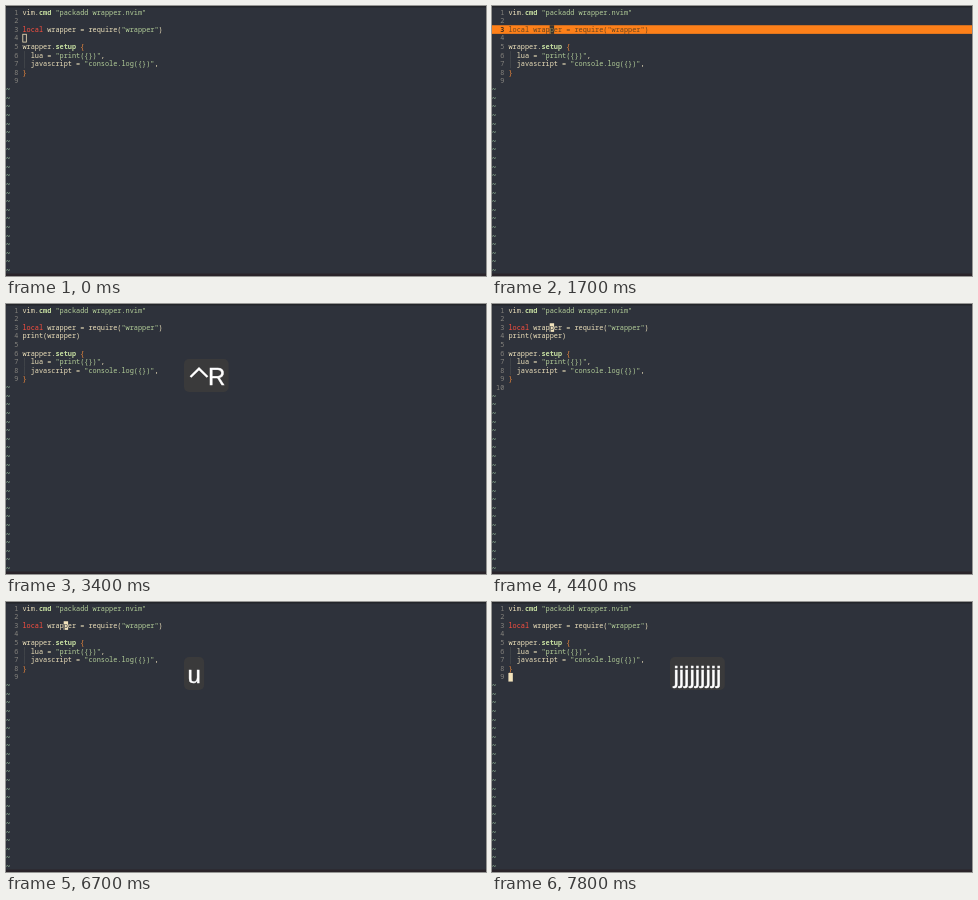
These frames come from a looping animation (480x270 px, 8000 ms). An HTML page with a canvas:

```html
<!DOCTYPE html>
<html lang="en">
<head>
<meta charset="utf-8">
<title>Editor session</title>
<style>
html, body { margin: 0; width: 100%; height: 100%; overflow: hidden; background: #2e323b; }
canvas { display: block; width: 480px; height: 270px; }
</style>
</head>
<body>
<canvas id="stage"></canvas>
<script>
const W = 480, H = 270, LOOP = 8000;
const LINE = 8.62, TOP = 2, LEFT = 16.4, FONT_SIZE = 6.88, COL = FONT_SIZE * 0.6;
const MONO = '"Noto Sans Mono", "DejaVu Sans Mono", monospace';
const KEY_FONT = '24px "Liberation Sans", Arial, sans-serif';
const C = {
  bg: '#2e323b', fg: '#ebdfba', red: '#fb4f40', green: '#b2cd98', func: '#c5dda0',
  orange: '#f38b3c', num: '#85837e', tilde: '#9cc5a0', guide: '#4c4f52',
  flash: '#fe8019', flashText: '#6a4520', cursor: '#f2e3bc', badge: '#3a3a3b'
};

const canvas = document.getElementById('stage');
const ctx = canvas.getContext('2d');
const ratio = window.devicePixelRatio || 1;
canvas.width = W * ratio;
canvas.height = H * ratio;

// Each token: text, colour, bold
const head = [
  [['vim.', C.fg], ['cmd', C.func, true], [' ', C.fg], ['"packadd wrapper.nvim"', C.green]],
  [],
  [['local', C.red], [' wrapper = require', C.fg], ['(', C.fg], ['"wrapper"', C.green], [')', C.fg]]
];
const added = [['print(wrapper)', C.fg]];
const tail = [
  [],
  [['wrapper.', C.fg], ['setup', C.func, true], [' {', C.orange]],
  [['  lua = ', C.fg], ['"print({})"', C.green], [',', C.fg]],
  [['  javascript = ', C.fg], ['"console.log({})"', C.green], [',', C.fg]],
  [['}', C.orange]],
  []
];
const shortDoc = [...head, ...tail];
const longDoc = [...head, added, ...tail];

const rowTop = row => TOP + (row - 1) * LINE;

function put(text, x, row, color, bold) {
  ctx.font = `${bold ? 700 : 500} ${FONT_SIZE}px ${MONO}`;
  ctx.fillStyle = color;
  ctx.fillText(text, x, rowTop(row) + 6.5);
}

function drawRow(tokens, row, flash) {
  let col = 0;
  if (flash) {
    ctx.fillStyle = C.flash;
    ctx.fillRect(0, rowTop(row), W, LINE);
  }
  const label = String(row);
  put(label, LEFT - COL * (label.length + 1), row, flash ? '#3a2c20' : C.num, flash);
  for (const [text, color, bold] of tokens) {
    put(text, LEFT + col * COL, row, flash ? C.flashText : color, bold);
    col += text.length;
  }
  if (tokens.length && tokens[0][0].startsWith('  ')) {
    ctx.fillStyle = C.guide;
    ctx.fillRect(LEFT + COL / 2 - 0.3, rowTop(row), 0.6, LINE);
  }
}

function drawCursor({ row, col, hollow, flash }) {
  const x = LEFT + col * COL, y = rowTop(row);
  if (hollow) {
    ctx.strokeStyle = C.cursor;
    ctx.lineWidth = 0.8;
    ctx.strokeRect(x + 0.4, y + 0.4, COL - 0.6, LINE - 0.8);
    return;
  }
  ctx.fillStyle = flash ? '#39352f' : C.cursor;
  ctx.fillRect(x, y, COL + 0.3, LINE);
  if (row === 3) put('p', x, row, flash ? '#a08a50' : C.bg);
}

function drawKeys({ text, ctrl, alpha = 1 }) {
  const pad = 3.4, x = 178, y = 55, base = y + 26, caret = ctrl ? 20.5 : 0;
  ctx.font = KEY_FONT;
  const width = caret + ctx.measureText(text).width + pad * 2;
  ctx.globalAlpha = alpha;
  ctx.fillStyle = C.badge;
  ctx.beginPath();
  ctx.roundRect(x, y, width, 33, 5);
  ctx.fill();
  ctx.fillStyle = ctx.strokeStyle = '#fff';
  ctx.lineWidth = 0.4;
  ctx.fillText(text, x + pad + caret, base);
  ctx.strokeText(text, x + pad + caret, base);
  if (ctrl) {
    ctx.lineWidth = 2.3;
    ctx.beginPath();
    ctx.moveTo(x + 6.5, y + 18);
    ctx.lineTo(x + 15, y + 9.7);
    ctx.lineTo(x + 23.5, y + 18);
    ctx.stroke();
  }
  ctx.globalAlpha = 1;
}

function cursorAt(t) {
  if (t < 100) return { row: 4, col: 0, hollow: true };
  if (t >= 3400 && t < 3500) return null;
  if (t < 7100) return { row: 3, col: 10, flash: t >= 1700 && t < 1900 };
  if (t < 7600) return { row: 4, col: 0 };
  return { row: Math.min(9, 7 + (t - 7600) / 100), col: 0 };
}

function keysAt(t) {
  if (t >= 3400 && t < 4100) {
    return { text: 'R', ctrl: true, alpha: Math.min(1, (4100 - t) / 400) };
  }
  if (t >= 6600 && t < 7100) return { text: 'u' };
  if (t >= 7600) return { text: 'j'.repeat(Math.min(9, 3 + (t - 7600) / 100 * 3)) };
  if (t >= 7100) return { text: 'j' };
  return null;
}

function draw(t) {
  ctx.setTransform(ratio, 0, 0, ratio, 0, 0);
  ctx.fillStyle = C.bg;
  ctx.fillRect(0, 0, W, H);
  ctx.fillStyle = '#23252a';
  ctx.fillRect(0, 0, W, 1.5);
  ctx.fillStyle = '#2a242a';
  ctx.fillRect(0, 267.5, W, 2.5);

  const cursor = cursorAt(t), keys = keysAt(t);
  const doc = t >= 3400 && t < 6600 ? longDoc : shortDoc;
  // The last number shows one step after the new line
  const rows = t >= 3400 && t < 3500 ? 9 : doc.length;
  for (let row = 1; row <= 31; row++) {
    if (row <= rows) drawRow(doc[row - 1], row, row === 3 && cursor && cursor.flash);
    else put('~', 0, row, C.tilde, true);
  }
  if (cursor) drawCursor(cursor);
  if (keys) drawKeys(keys);
}

function tick() {
  const t = performance.now() % LOOP;
  draw(Math.floor(t / 100) * 100);
  requestAnimationFrame(tick);
}
tick();
</script>
</body>
</html>
```
